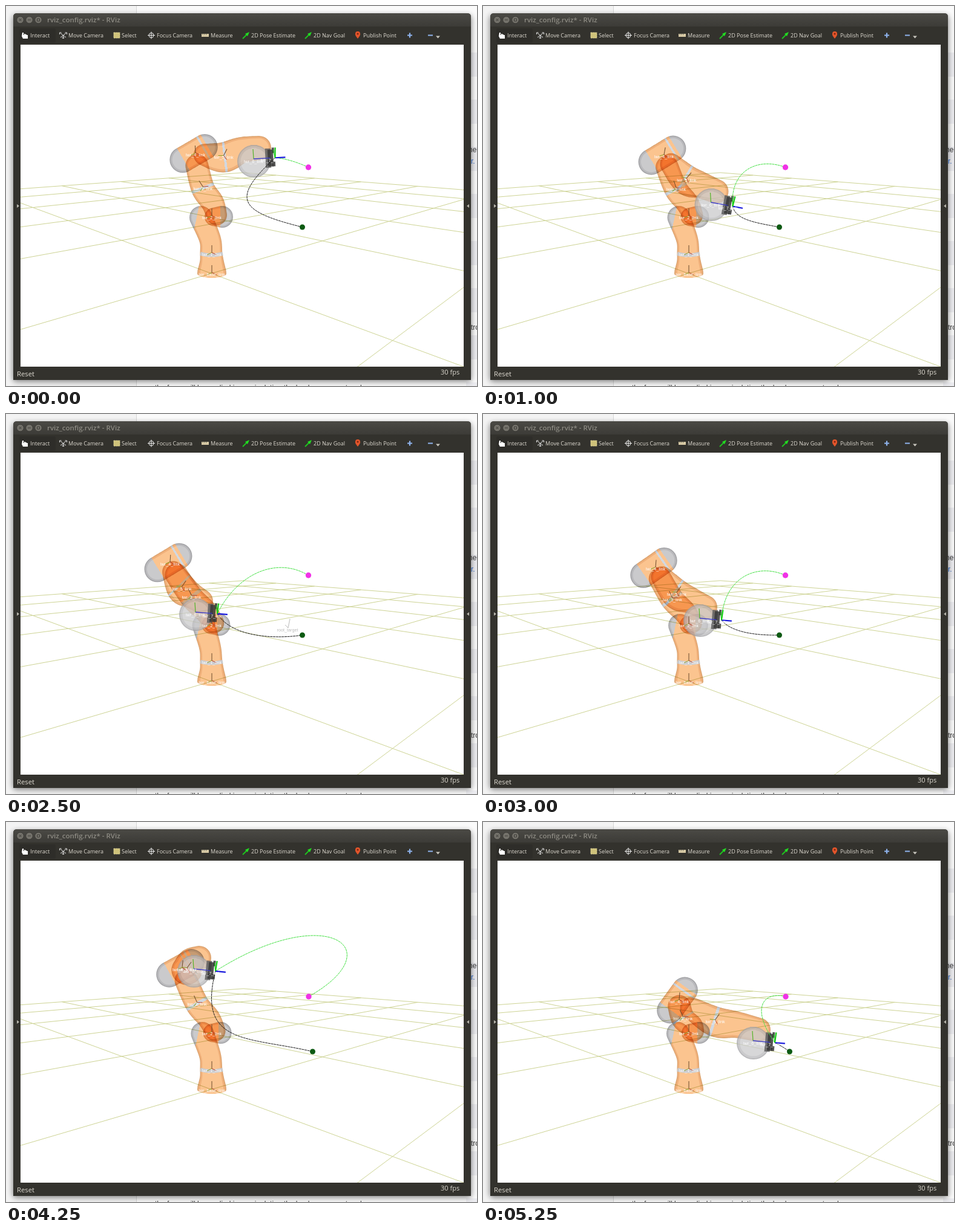
An HTML page with a canvas that plays this animation: 778x629 px, repeating every 5.5 s.

```html
<!DOCTYPE html>
<html lang="en">
<head>
<meta charset="utf-8">
<title>rviz_config.rviz* - RViz</title>
<style>
html, body { margin: 0; width: 100%; height: 100%; overflow: hidden; background: #f3f3f3; }
svg, canvas { position: absolute; display: block; }
svg { left: 0; top: 0; font-family: "Open Sans", "Noto Sans", sans-serif; }
canvas { left: 24px; top: 64px; }
.tools text { font-size: 9px; fill: #dfdbd2; }
</style>
</head>
<body>
<svg width="778" height="629" viewBox="0 0 778 629">
  <defs>
    <linearGradient id="bar" x2="0" y2="1"><stop stop-color="#4b4a45"/><stop offset="1" stop-color="#3c3b37"/></linearGradient>
    <filter id="soft" x="-5%" y="-5%" width="110%" height="110%"><feGaussianBlur stdDeviation="5"/></filter>
    <pattern id="rows" width="18" height="78" y="77" patternUnits="userSpaceOnUse"><rect width="18" height="40" fill="#ececf0"/></pattern>
    <g id="arrow"><path d="M-5 5L2-2" stroke="#1fc41f" stroke-width="2"/><path d="M6-6L3 1L-1-3Z" fill="#22dd22"/></g>
  </defs>
  <rect width="778" height="629" fill="#f3f3f3"/>
  <rect x="216" width="562" height="629" fill="#fafafa"/>
  <path d="M215.5 0V629" stroke="#d6d6d6"/>
  <rect x="760" y="77" width="18" height="552" fill="url(#rows)"/>
  <rect x="11" y="15" width="758" height="607" rx="6" opacity=".45" filter="url(#soft)"/>
  <g font-size="12" font-family="Liberation Sans, Arial, sans-serif" fill="#333">
    <text x="764" y="242">ne</text><text x="768" y="261" fill="#2a5db0">r.</text><text x="768" y="536">tro</text>
    <text x="246" y="636">the force will be applied in manipulating the load component and</text>
  </g>
  <path d="M12 619V18Q12 12 18 12H762Q768 12 768 18V619Z" fill="#33322d"/>
  <path d="M12 34V18Q12 12 18 12H762Q768 12 768 18V34Z" fill="url(#bar)"/>
  <g fill="#74726b" stroke="#3c3b37">
    <circle cx="23.500" cy="23" r="5.800"/><circle cx="38.500" cy="23" r="5.800"/><circle cx="53.500" cy="23" r="5.800"/>
    <path d="M21.500 21l4 4m0-4l-4 4M36 23h5M51.500 21h4v4h-4z" fill="none"/>
  </g>
  <text x="68" y="27" font-size="11.500" font-weight="600" fill="#8d8b83">rviz_config.rviz* - RViz</text>
  <rect x="22" y="37" width="60" height="24" rx="3" fill="#2e2d29"/>
  <g class="tools">
    <path d="M27 44h2v4h1v-2h2v1h2v1h2v6h-8l-2-4z" fill="#fff"/>
    <path d="M90 45l9 7M99 45l-9 7M94.500 48v6M88.500 47v-3h3M97.500 44h3v3M92.500 52l2 2 2-2" stroke="#e8e8e8" fill="none"/>
    <rect x="178" y="44" width="10" height="9" fill="#cfc27a" stroke="#e6dc9a" stroke-dasharray="2 1"/>
    <circle cx="240" cy="48.500" r="4" fill="none" stroke="#eee"/><path d="M234 48.500h12M240 42.500v12" stroke="#eee"/>
    <rect x="323" y="46" width="12" height="5" fill="#d9cba6"/><path d="M325 46v2m3-2v2m3-2v2" stroke="#776"/>
    <use href="#arrow" x="396" y="49"/><use href="#arrow" x="499" y="49"/>
    <path d="M581 54Q576 48 577 46A4 4 0 0 1 585 46Q586 48 581 54Z" fill="#e2552b"/><circle cx="581" cy="46" r="1.500" fill="#7c2410"/>
    <path d="M663 48.500h8M667 44.500v8M697 48.500h8" stroke="#8fb4ee" stroke-width="2.200"/>
    <path d="M710 49.500h7l-3.500 4z" fill="#c8c6be"/>
    <text x="40" y="52">Interact</text><text x="103" y="52">Move Camera</text><text x="191" y="52">Select</text>
    <text x="249" y="52">Focus Camera</text><text x="338" y="52">Measure</text><text x="405" y="52">2D Pose Estimate</text>
    <text x="508" y="52">2D Nav Goal</text><text x="590" y="52">Publish Point</text>
  </g>
  <path d="M18 328l4 3-4 3zM765 328l-4 3 4 3z" fill="#b5b3aa"/>
  <text x="18" y="613" font-size="11.300" fill="#dfdbd2">Reset</text>
  <text x="718" y="610" font-size="11" fill="#dfdbd2">30 fps</text>
</svg>
<canvas id="view" width="732" height="533"></canvas>
<script>
const view = document.getElementById('view'), ctx = view.getContext('2d');
const layer = document.createElement('canvas');
layer.width = view.width;
layer.height = view.height;
const ink = layer.getContext('2d');
ctx.translate(-24, -64);
ink.translate(-24, -64);

// Two joints and the tool angle fix the arm; each path has two Bezier handles
const pose = (elbow, wrist, aim, trail, plan) => ({ elbow, wrist, aim: [aim], trail, plan });
const reach = pose([310, 244], [409, 257], -3, [480, 258, 460, 252], [370, 320, 385, 340]);
const dip = pose([296, 231], [350, 306], 15, [455, 245, 405, 262], [385, 350, 420, 355]);
const low = pose([296, 263], [403, 352], 6, [455, 255, 410, 280], [450, 356, 470, 361]);
const fold = pose([268, 246], [313, 332], 4, [450, 237, 385, 260], [375, 372, 450, 372]);
const high = pose([325, 274], [412, 262], -11, [535, 225, 520, 230], [320, 235, 320, 345]);
const tuck = pose([288, 242], [310, 247], 6, [640, 210, 530, 130], [315, 370, 400, 355]);
const stretch = pose([321, 295], [446, 366], 5, [465, 280, 440, 305], [488, 368, 498, 374]);

// Three runs, each starting afresh; keys are [step, pose]
const STEP = 250, STEPS = 22;
const RUNS = [
  { from: 0, start: [499.5, 267], goal: [489.5, 366], keys: [[0, reach], [2, dip], [6, low]] },
  { from: 8, start: [499.5, 267], goal: [489.5, 366], keys: [[8, reach], [10, fold], [14, low]] },
  { from: 15, start: [500, 289], goal: [506.5, 380], keys: [[15, high], [17, tuck], [21, stretch]] }
];

const lerp = (a, b, u) => a.map((v, i) => v + (b[i] - v) * u);
const add = (p, x, y) => [p[0] + x, p[1] + y];
const rad = deg => deg * Math.PI / 180;
const polar = (p, r, deg) => add(p, r * Math.cos(rad(deg)), r * Math.sin(rad(deg)));

function poseAt(keys, n) {
  const i = n < keys[1][0] ? 0 : 1, [n0, a] = keys[i], [n1, b] = keys[i + 1];
  const u = Math.min(1, (n - n0) / (n1 - n0)), mix = {};
  for (const key in a) mix[key] = lerp(a[key], b[key], u);
  return mix;
}

// Catmull-Rom samples through points [x, y, radius]
function spline(pts) {
  const out = [], last = pts.length - 1;
  const at = i => pts[Math.max(0, Math.min(last, i))];
  for (let s = 0; s <= last * 16; s++) {
    const i = Math.min(last - 1, s >> 4), t = s / 16 - i;
    const a = at(i - 1), b = at(i), c = at(i + 1), d = at(i + 2);
    out.push(b.map((v, k) => v + t * ((c[k] - a[k]) / 2 +
      t * (a[k] - 2.5 * v + 2 * c[k] - d[k] / 2 + t * (1.5 * (v - c[k]) + (d[k] - a[k]) / 2)))));
  }
  return out;
}

// Edge to centre shades
const TONES = {
  o: ['#dba36f', '#f0b07a', '#fbc48f'],
  g: ['#a3a3a6', '#b9b9bc', '#cacacc'],
  r: ['#b4bac2', '#c6ccd4', '#d2d8e0']
};

// Rounded link; bands are [start, tone] along the axis; overlaps darken
function tube(joints, bands, axis, mode = 'multiply', alpha = 1) {
  const pts = spline(joints), [a, b] = [pts[0], pts[pts.length - 1]];
  const deg = Math.atan2(b[1] - a[1], b[0] - a[0]) * 180 / Math.PI;
  axis = axis || [...polar(a, -a[2], deg), ...polar(b, b[2], deg)];
  ink.clearRect(0, 0, 800, 640);
  [1, 0.93, 0.8].forEach((scale, shade) => {
    const fill = ink.createLinearGradient(...axis);
    bands.forEach(([start, tone], i) => {
      fill.addColorStop(start, TONES[tone][shade]);
      fill.addColorStop(i + 1 < bands.length ? bands[i + 1][0] : 1, TONES[tone][shade]);
    });
    ink.fillStyle = fill;
    ink.beginPath();
    for (const [x, y, r] of pts) {
      ink.moveTo(x + r * scale, y);
      ink.arc(x, y, r * scale, 0, 7);
    }
    ink.fill();
  });
  ctx.globalCompositeOperation = mode;
  ctx.globalAlpha = alpha;
  ctx.drawImage(layer, 24, 64);
  ctx.globalCompositeOperation = 'source-over';
  ctx.globalAlpha = 1;
}

function line(x1, y1, x2, y2, color, width = 1) {
  ctx.strokeStyle = color;
  ctx.lineWidth = width;
  ctx.beginPath();
  ctx.moveTo(x1, y1);
  ctx.lineTo(x2, y2);
  ctx.stroke();
}

function curve(from, handles, to, color) {
  ctx.strokeStyle = color;
  ctx.lineWidth = 1;
  ctx.setLineDash([4, 0.7]);
  ctx.beginPath();
  ctx.moveTo(...from);
  ctx.bezierCurveTo(...handles, ...to);
  ctx.stroke();
  ctx.setLineDash([]);
}

function dot([x, y], r, color) {
  ctx.fillStyle = color;
  ctx.beginPath();
  ctx.arc(x, y, r, 0, 7);
  ctx.fill();
}

function label(text, [x, y], color = '#fff') {
  ctx.font = '7.2px "Liberation Sans", Arial, sans-serif';
  ctx.textAlign = 'center';
  ctx.fillStyle = color;
  ctx.fillText(text, x, y + 2.5);
}

function turned([x, y], deg, paint) {
  ctx.save();
  ctx.translate(x, y);
  ctx.rotate(rad(deg));
  paint();
  ctx.restore();
}

// Ground plane: two pencils of lines meeting the horizon
function ground() {
  const left = { x: -246, m: k => 1 / (2.7 + 2.02 * k) };
  const right = { x: 1076, m: k => 1 / (3.4 + 2.065 * k) };
  const cross = (i, j) => {
    const a = right.m(i), b = left.m(j), x = (a * right.x + b * left.x) / (a + b);
    return [x, 226 + b * (x - left.x)];
  };
  for (let k = -1; k <= 5; k++) {
    line(...cross(k, 5), 0, 226 + right.m(k) * right.x, '#cdd394');
    line(...cross(5, k), 800, 226 + left.m(k) * (800 - left.x), '#cdd394');
  }
}

function base(x) {
  ctx.save();
  ctx.beginPath();
  ctx.rect(290, 320, 100, 122);
  ctx.ellipse(340, 442, 25, 8, 0, 0, 7);
  ctx.clip();
  tube([[340, 442, 24], [340, 425, 20], [339, 410, 18.5], [337, 386, 18], [x, 350, 19]],
    [[0, 'o'], [0.8, 'g']], [x + 38, 362, x - 19, 350]);
  ctx.restore();
  ctx.strokeStyle = 'rgba(198,206,214,.9)';
  ctx.lineWidth = 6;
  ctx.beginPath();
  ctx.moveTo(321, 410);
  ctx.quadraticCurveTo(339, 415, 358, 410);
  ctx.stroke();
}

function joint(p, deg) {
  turned(p, deg, () => {
    line(0, 0, 8, 4, '#b8402a');
    line(0, 0, -8, 4, '#8ea32c');
    line(0, 0, 0, -12, '#6b4a2c');
  });
}

function frame(p, deg, size) {
  turned(p, deg, () => {
    line(0, 0, size, 0, '#1818dc', 2.2);
    line(0, 0, 1, -size, '#12cc12', 2.2);
    line(0, 0, -3, -size * 0.8, '#12cc12');
  });
}

function gripper(p, deg) {
  turned(p, deg, () => {
    ctx.fillStyle = 'rgba(95,95,95,.85)';
    ctx.fillRect(-8, -16, 9, 32);
    ctx.fillStyle = 'rgba(55,55,55,.85)';
    ctx.fillRect(-4, -14, 9, 28);
    ctx.fillRect(3, -17, 4, 9);
    ctx.fillRect(3, 6, 5, 8);
  });
}

function draw(n) {
  const run = RUNS.filter(r => n >= r.from).pop();
  const { elbow, wrist, aim: [aim], trail, plan } = poseAt(run.keys, n);
  const waist = lerp([338, 350], elbow, 0.45), mid = lerp(elbow, wrist, 0.5);
  const hip = [357 - Math.max(0, 310 - elbow[0]) / 9, 349];
  const hand = polar(wrist, 28, aim - 8), tip = polar(hand, 8, aim);
  const tilt = -24 - 0.47 * (elbow[1] - 231);

  ctx.fillStyle = '#fff';
  ctx.fillRect(24, 64, 732, 533);
  ground();

  base(679 - hip[0]);
  tube([[...add(hip, -9, -3), 17], [...lerp(hip, waist, 0.5), 19], [...waist, 19.5], [...lerp(waist, elbow, 0.65), 19]],
    [[0, 'o'], [0.52, 'r'], [0.56, 'o']]);
  tube([[...add(hip, -14, 0), 15], [...hip, 18]], [[0, 'o'], [0.55, 'g']]);
  tube([[...polar(elbow, -21, tilt), 21.5], [...polar(elbow, 21, tilt), 21.5]],
    [[0, 'g'], [0.27, 'o'], [0.7, 'r'], [0.74, 'o'], [0.8, 'g']]);
  tube([[...lerp(elbow, wrist, 0.18), 18], [...mid, 25], [...add(lerp(elbow, wrist, 0.78), 0, -15), 22], [...add(wrist, 9, -22), 20]],
    [[0, 'o'], [0.38, 'r'], [0.41, 'o']]);
  tube([[...wrist, 27], [...add(wrist, 1, 0), 27]], [[0, 'g']], null, 'source-over', 0.75);
  gripper(hand, aim);

  curve(run.start, trail, tip, '#43e043');
  curve(tip, plan, run.goal, '#1a1a1a');
  dot(run.start, 4.7, '#f032e6');
  dot(run.goal, 4.5, '#0c5a12');

  const links = [[340, 444], [340, 411], [340, 350], waist, add(elbow, 3, 2), mid, wrist, add(hand, 0, 4)];
  links.slice(0, 6).forEach((p, i) => joint(add(p, 0, -3), i < 3 ? 0 : aim + 30 * (i - 4)));
  line(wrist[0], wrist[1] - 4, wrist[0] - 1, wrist[1] - 20, '#58b42c', 1.3);
  line(wrist[0], wrist[1] - 4, ...hand, '#3c3cc8', 1.3);
  frame(tip, aim, 17);
  links.forEach((p, i) => label(i ? `lwr_${i}_link` : 'lwr_base_link', p));

  // target frame left behind by the first run
  if (n > 4 && n < 11) {
    ctx.globalAlpha = Math.min(1, (12 - n) / 5);
    if (n < 8) frame([466, 354], 4, 15);
    else {
      line(466, 354, 469, 339, '#888', 1.5);
      line(466, 354, 461, 349, '#555');
      label('root_target', [465, 357], '#555');
    }
    ctx.globalAlpha = 1;
  }
}

let shown = -1;
function tick(now) {
  const n = Math.floor(now / STEP) % STEPS;
  if (n !== shown) draw(shown = n);
  requestAnimationFrame(tick);
}
draw(0);
requestAnimationFrame(tick);
</script>
</body>
</html>
```
